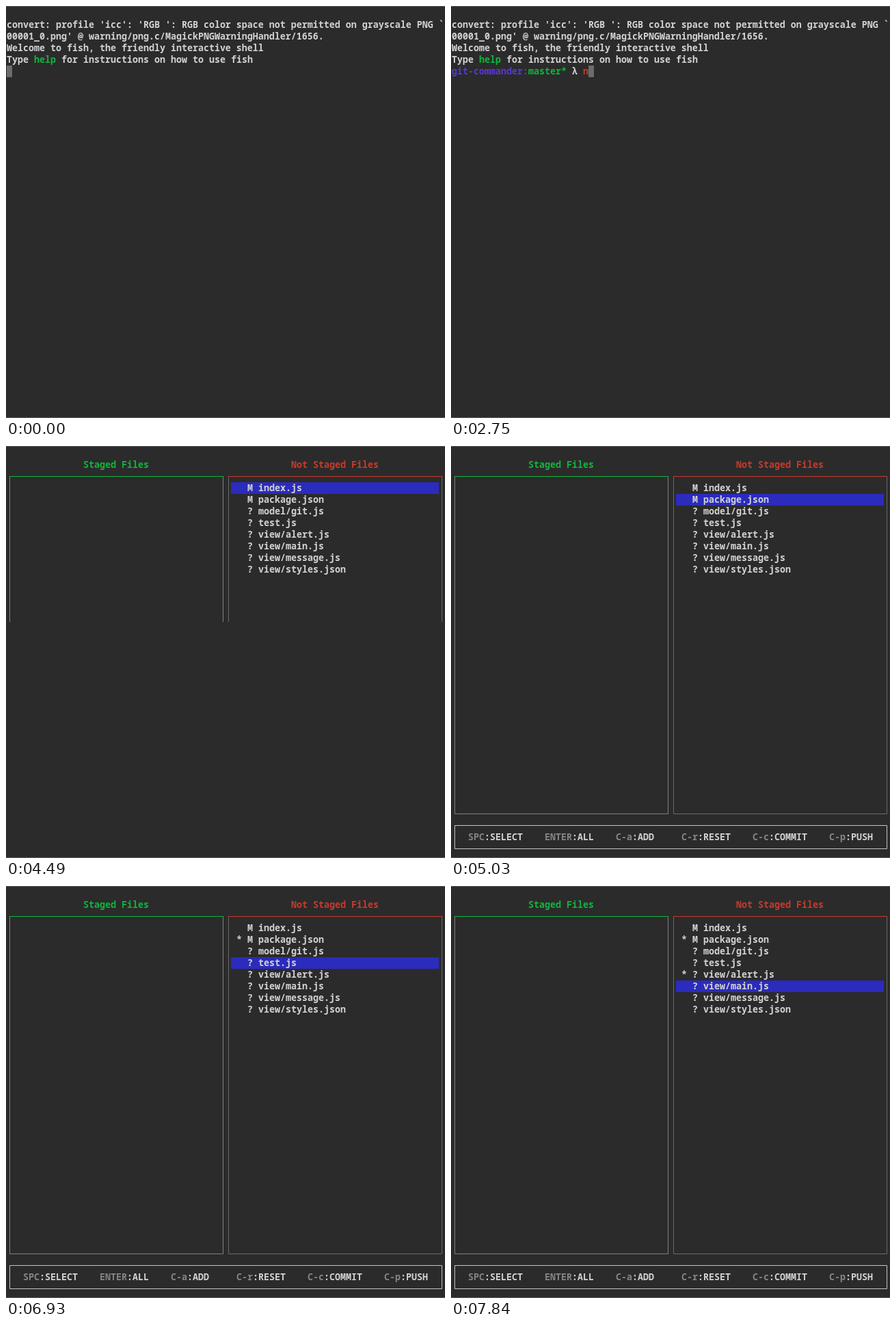
Recreate the animation shown at these times as an HTML page. Size 642 px wide and 602 px high, loop 8 s.

```html
<!DOCTYPE html>
<html lang="en">
<head>
<meta charset="utf-8">
<title>Terminal session</title>
<style>
  html, body { margin: 0; width: 100%; height: 100%; overflow: hidden; background: #2b2b2b; }
  svg { display: block; width: 642px; height: 602px; }
  text { font: 600 13.333px "Noto Sans Mono", "DejaVu Sans Mono", monospace; white-space: pre; }
</style>
</head>
<body>
<svg id="screen" viewBox="0 0 642 602"></svg>
<script>
const LOOP = 8000, CELL_W = 8, CELL_H = 17;
const C = {
  text: '#d2d2d2', dim: '#858585', green: '#0fb63c', red: '#c83a2c', purple: '#5a36dc',
  blue: '#3a80e2', cyan: '#1cc0ec', cursor: '#6c6c6c', select: '#2b2bbd'
};
const screen = document.getElementById('screen');
const x = col => 1 + col * CELL_W;
const y = row => 2 + row * CELL_H;

const put = (row, col, str, color = C.text, extra = '') =>
  `<text x="${x(col)}" y="${y(row) + 13}" fill="${color}" ${extra}>${str}</text>`;
const fill = (row, col, width, color) =>
  `<rect x="${x(col)}" y="${y(row)}" width="${width * CELL_W}" height="${CELL_H}" fill="${color}"/>`;
const cursor = (row, col) => fill(row, col, 1, C.cursor);
const line = (d, color) => `<path d="${d}" fill="none" stroke="${color}"/>`;

const edges = line('M0 .5H642M0 601.5H642', '#5c5c5c');

// Shell
const banner =
  put(1, 0, "convert: profile 'icc': 'RGB ': RGB color space not permitted on grayscale PNG `") +
  put(2, 0, "00001_0.png' @ warning/png.c/MagickPNGWarningHandler/1656.") +
  put(3, 0, 'Welcome to fish, the friendly interactive shell') +
  put(4, 0, 'Type') + put(4, 5, 'help', C.green) +
  put(4, 10, 'for instructions on how to use fish');
const prompt = put(5, 0, 'git-commander:', C.purple) + put(5, 14, 'master*', C.green) + put(5, 22, 'λ');
const COMMAND = 'node index.js', START = 24;

const shell = (content, row, col) => banner + cursor(row, col) + content;
const typing = (count, suggest) => shell(prompt +
  put(5, START, COMMAND.slice(0, count), C.red) +
  (suggest ? put(5, START + count, COMMAND.slice(count), C.dim) : ''), 5, START + count);
const command = underline => prompt + put(5, START, 'node', C.blue) +
  put(5, START + 5, 'index.js', C.cyan, underline ? 'text-decoration="underline"' : '');

// File panels
const files = ['M index.js', 'M package.json', '? model/git.js', '? test.js', '? view/alert.js',
  '? view/main.js', '? view/message.js', '? view/styles.json'];
const keys = [[3, 'SPC', 'SELECT'], [17, 'ENTER', 'ALL'], [30, 'C-a', 'ADD'],
  [42, 'C-r', 'RESET'], [55, 'C-c', 'COMMIT'], [69, 'C-p', 'PUSH']];

function panel(left, titleCol, title, color, side, complete) {
  const right = left + 312, bottom = complete ? 537.5 : 257;
  return put(1, titleCol, title, color) +
    line(`M${left} 44V${bottom}${complete ? 'H' : 'M'}${right}${complete ? '' : ' ' + bottom}V44`, side) +
    line(`M${left - .5} 44.5H${right + .5}`, color);
}

function panels(selected, marked = [], complete = true) {
  const list = files.map((name, i) =>
    (i === selected ? fill(3 + i, 41, 38, C.select) : '') +
    (marked.includes(i) ? put(3 + i, 42, '*') : '') + put(3 + i, 44, name)).join('');
  const footer = line('M5.5 554.5H637.5V588.5H5.5Z', '#c4c4c4') +
    keys.map(([col, key, action]) =>
      put(33, col, key, C.dim) + put(33, col + key.length, ':' + action)).join('');
  return panel(5.5, 14, 'Staged Files', C.green, '#808080', complete) +
    panel(325.5, 52, 'Not Staged Files', C.red, '#696969', complete) +
    list + (complete ? footer : '');
}

// Each scene holds from its start time until the next one.
const scenes = [
  [0, shell('', 5, 0)],
  [230, shell(prompt, 5, START + 1)],
  [330, shell(prompt, 5, START)],
  [2750, typing(1)],
  [2850, typing(1, true)],
  [2930, typing(2, true)],
  [3010, typing(3, true)],
  [3100, typing(4, true)],
  [3240, shell(command(false), 5, START + COMMAND.length)],
  [3340, shell(command(true), 5, START + COMMAND.length)],
  [3890, banner + command(true)],
  [3990, shell(command(true), 6, 0)],
  [4490, panels(0, [], false)],
  [4930, panels(0)],
  [5030, panels(1)],
  [6450, panels(1, [1])],
  [6700, panels(2, [1])],
  [6930, panels(3, [1])],
  [7480, panels(4, [1])],
  [7630, panels(4, [1, 4])],
  [7840, panels(5, [1, 4])]
];

let shown;
function draw() {
  const time = performance.now() % LOOP;
  const scene = scenes.findLast(([start]) => start <= time);
  if (scene !== shown) {
    shown = scene;
    screen.innerHTML = edges + scene[1];
  }
  requestAnimationFrame(draw);
}
draw();
</script>
</body>
</html>
```
